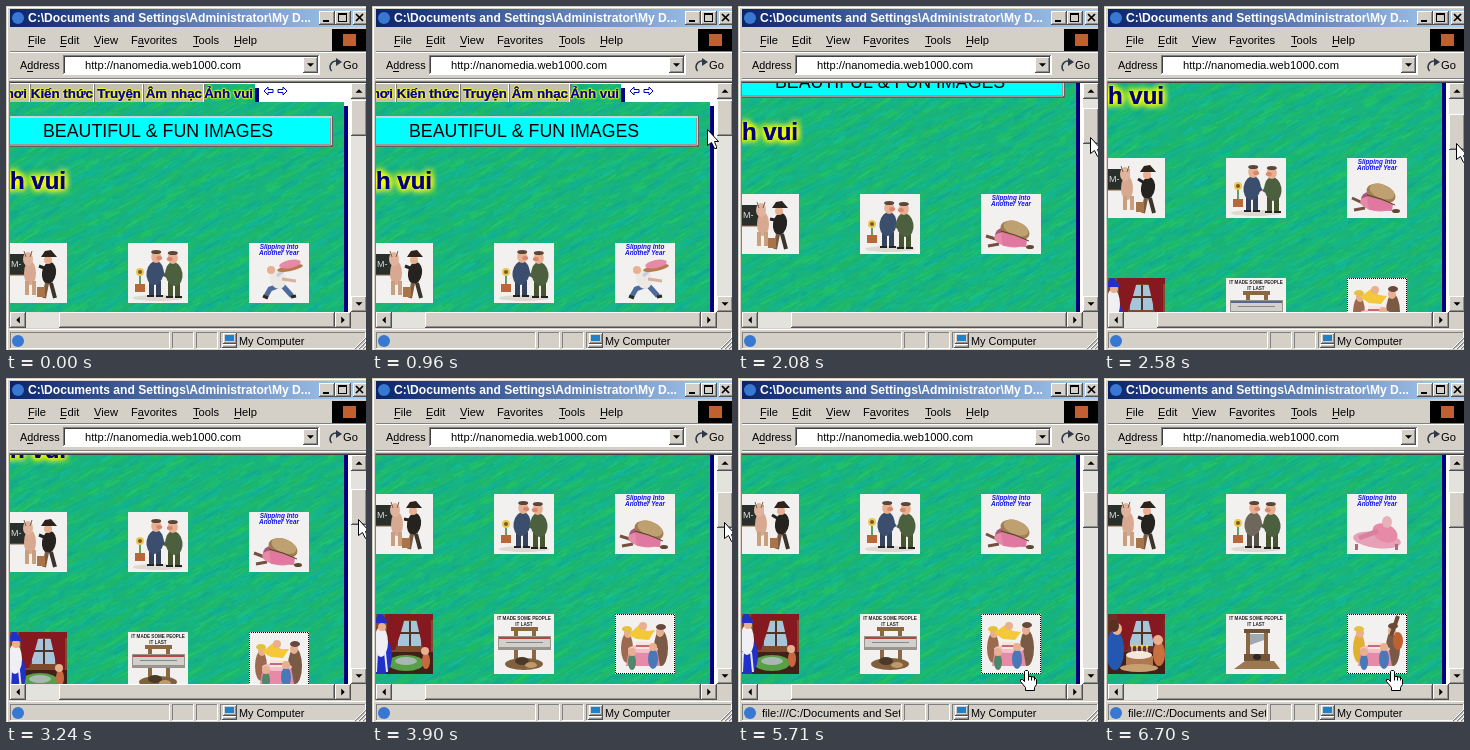
Recreate the animation shown at these times as an HTML page with a canvas. Size 360 by 344 pixels, loop 8 s.

```html
<!DOCTYPE html>
<html lang="en">
<head>
<meta charset="utf-8">
<title>Scrolling a picture page</title>
<style>
html, body { margin: 0; width: 360px; height: 344px; overflow: hidden; }
canvas { display: block; }
</style>
</head>
<body>
<canvas id="stage" width="360" height="344"></canvas>
<script>
const LOOP = 8000, FACE = '#d4d0c8', TRACK = '#e4e2dc';
const SANS = '"Liberation Sans", Arial, sans-serif';
const SKIN = '#e8b090', WOOD = '#8a6844', PINK = '#e68aa8';
const TOP = 77, BOTTOM = 306;
const stage = document.getElementById('stage').getContext('2d');
let c = stage;

// start time, page scroll, pointer x, pointer y
const steps = [
  [0, 0, -50, 0], [480, 0, 72, 127], [640, 0, 168, 127], [800, 0, 270, 127],
  [960, 0, 335, 123], [1120, 0, 347, 123], [1280, 0, 349, 123], [1760, 0, 349, 123],
  [1920, 12, 352, 125], [2080, 49, 352, 131], [2580, 85, 352, 137], [3240, 103, 352, 141],
  [3900, 121, 352, 144], [5060, 121, 349, 179], [5220, 121, 347, 277],
  [5380, 121, 335, 294], [5710, 121, 282, 291], [6700, 121, 282, 291]
];
const FALL = 7, ROW_TWO = 11, HOVER = 16, FINALE = 17;

function box(color, x, y, w, h) { c.fillStyle = color; c.fillRect(x, y, w, h); }
function oval(color, x, y, rx, ry = rx, turn = 0) {
  c.fillStyle = color;
  c.beginPath(); c.ellipse(x, y, rx, ry, turn, 0, 7); c.fill();
}
function line(color, width, ...p) {
  c.strokeStyle = color; c.lineWidth = width;
  c.beginPath();
  for (let i = 0; i < p.length; i += 2) c.lineTo(p[i], p[i + 1]);
  c.stroke();
}
function poly(fill, stroke, ...p) {
  c.beginPath();
  for (let i = 0; i < p.length; i += 2) c.lineTo(p[i], p[i + 1]);
  c.closePath();
  if (fill) { c.fillStyle = fill; c.fill(); }
  if (stroke) { c.strokeStyle = stroke; c.lineWidth = 1; c.stroke(); }
}
function text(s, x, y, size = 11.2, color = '#000', weight = '', align = 'left') {
  c.font = `${weight} ${size}px ${SANS}`;
  c.textAlign = align; c.fillStyle = color;
  c.fillText(s, x, y);
}
function glow(s, x, y, size, color, blur) {
  c.shadowColor = '#ff0'; c.shadowBlur = blur;
  for (let i = 0; i < 5; i++) text(s, x, y, size, color, 'bold', 'right');
  c.shadowBlur = 0;
}
function bevel(x, y, w, h, fill = FACE, sunk = false) {
  const [lit, dim] = sunk ? ['#808080', '#fff'] : ['#fff', '#505050'];
  box(dim, x, y, w, h);
  box(lit, x, y, w - 1, h - 1);
  if (!sunk) box('#909090', x + 1, y + 1, w - 2, h - 2);
  box(fill, x + 1, y + 1, w - (sunk ? 2 : 3), h - (sunk ? 2 : 3));
}
function arrow(x, y, turn, size = 3.5) {
  c.save(); c.translate(x, y); c.rotate(turn);
  poly('#000', null, -size, -size / 2, size, -size / 2, 0, size / 2);
  c.restore();
}

// Brushed green paper with diagonal teal bands
function makePaper() {
  const sheet = document.createElement('canvas');
  sheet.width = 334; sheet.height = 360;
  c = sheet.getContext('2d');
  let seed = 7;
  const rnd = () => (seed = seed * 16807 % 2147483647) / 2147483647;
  box('#18b47c', 0, 0, 334, 360);
  c.globalAlpha = .6;
  for (let i = 0; i < 9000; i++) {
    const x = rnd() * 370 - 20, y = rnd() * 370, len = 4 + rnd() * 11;
    const band = Math.sin((y + x * .55 + 3 * Math.sin(x / 23)) / 20 * 2 * Math.PI);
    const wave = band + (rnd() - .5) * 1.3;
    line(`hsl(${157 - wave * 12} ${74 - wave * 6}% ${39 + wave * 3 + rnd() * 5}%)`, 1 + rnd() * 1.5,
      x, y, x + len, y - len * .55);
  }
  c = stage;
  return sheet;
}
const paper = makePaper();

function man(x, y, coat, legs, lean) {
  const side = Math.sign(lean);
  box(legs, x - 6, y + 27, 5, 15); box(legs, x + 1, y + 27, 5, 15);
  box('#222', x - 8, y + 41, 7, 2); box('#222', x + 1, y + 41, 7, 2);
  oval(coat, x, y + 19, 8.5, 12, lean);
  line(coat, 4, x + 3 * side, y + 12, x + 9 * side, y + 22);
  oval(SKIN, x + lean * 8, y + 3, 5, 6);
  oval('#d88870', x + lean * 8 + 3 * side, y + 4, 3, 2);
  oval('#5a4638', x + lean * 8, y - 2, 5, 2);
}

// Each picture takes the step number, a small wobble and whether it has ended
const pictures = [
  // Classroom
  (n, w, end) => {
    box('#29302c', 0, 11, 24, 21);
    line(WOOD, 1, 0, 32, 24, 32, 24, 11);
    text('M-', 4, 24, 9, '#ddd');
    oval('#d8a890', 23 + w, 30, 6, 12); oval('#e0b49c', 21 + w, 16, 5, 7);
    line('#806050', 1, 17 + w, 8, 19 + w, 14); line('#806050', 1, 25 + w, 8, 23 + w, 14);
    box('#c8a080', 18, 38, 4, 14); box('#c8a080', 25, 38, 4, 14);
    const x = end ? 43 : 42 - w;
    oval('#26221f', x, 30, 7, 11, .15); oval(SKIN, x - 1, 17, 4);
    poly('#2c241c', null, x - 8, 14, x + 8, 14, x + 2, 7, x - 4, 8);
    line('#26221f', 3, x, 27, x - 10, 23 + w * 2);
    line('#7a5a40', 4, x - 2, 40, x - 5, 55); line('#3c342c', 4, x + 2, 40, x + 6, 55);
    box('#a87448', x - 12, 44, 8, 10);
  },
  // Two gentlemen
  (n, w, end) => {
    oval('#ddd8d0', 30, 55, 25, 3);
    box('#b86838', 7, 41, 10, 8);
    line('#388038', 1.5, 12, 41, 12, 30);
    oval('#e8c850', 12, 29 + w, 4); oval('#805828', 12, 29 + w, 2);
    man(27 + w, 11, end ? '#6d675c' : '#3c4e6e', end ? '#575046' : '#34445e', .15);
    man(46 - w, 12, '#4c6040', '#46542f', -.15);
  },
  // The cake carrier
  (n, w, end) => {
    text('Slipping Into', 30, 6, 6.4, '#1010f0', 'bold italic', 'center');
    text('Another Year', 30, 12, 6.4, '#1010f0', 'bold italic', 'center');
    if (end) {
      oval('#e8a0b8', 30, 46, 24, 8, .12); oval(PINK, 38, 39, 13, 9, .4);
      oval('#e8b0b8', 40, 28, 5, 6); line('#d880a0', 5, 31, 37, 12, 44);
      box('#b06878', 8, 50, 3, 6); box('#b06878', 48, 50, 3, 6);
    } else if (n < FALL) {
      c.save(); c.translate(30, 36); c.rotate(n < 5 ? 0 : .15);
      line('#4e6a9c', 5, 2, 6, -9, 10, -13, 17); line('#4e6a9c', 5, 3, 6, 13, 17);
      line('#302820', 3, 12, 18, 17, 17); line('#302820', 3, -16, 17, -11, 19);
      oval('#ece8e4', -1, 0, 8, 10, -.3); oval(SKIN, -8, -9, 4);
      line('#c8ccd8', 3, -2, -3, 8, -11); line('#d8b0a0', 3, 3, 0, 17, 2);
      oval('#b87850', 11, -11, 13, 3, -.2); oval(PINK, 11, -15, 11, 4, -.2);
      c.restore();
    } else {
      line('#735040', 3, 18, 46, 5, 41 + w); line('#735040', 3, 18, 50, 7, 52);
      oval('#a85878', 22, 42, 8, 8); oval(PINK, 28, 46, 15, 7, .2);
      oval('#a07c50', 34, 36 + w / 2, 15, 9, .35);
      oval('#bfa070', 35, 34 + w / 2, 13, 7, .35);
      poly('#e078a0', null, 20, 38, 34, 42, 46, 46, 45, 53, 22, 52);
      line('#58402c', 1, 20, 37, 34, 41, 48, 47);
      oval('#604830', 49, 53, 4, 2);
    }
  },
  // Curtained room
  (n, w, end) => {
    box(end ? '#6c3026' : '#7c4a2c', 0, 0, 60, 60);
    box('#a8c4d8', 25, 7, 23, 25);
    line('#4c3428', 2, 37, 7, 37, 32); line('#4c3428', 2, 25, 19, 48, 19);
    poly('#861820', null, 14, 0, 33, 0, 28, 18, 22, 36, 14, 36);
    poly('#861820', null, 42, 0, 58, 0, 58, 38, 50, 35);
    box('#861820', 12, 0, 48, 6);
    box('#402018', 0, 38, 60, 22);
    if (end) {
      box('#b07850', 21, 42, 27, 9); oval('#f4e8da', 34, 41, 13, 4);
      for (let x = 27; x < 44; x += 5) { line('#fff', 1, x, 39, x, 33); oval('#f8d040', x, 32, 1.5); }
      oval('#c8a070', 34, 54, 19, 4);
      oval('#2458b0', 10, 36, 9, 20); oval(SKIN, 12, 15, 5, 6); oval('#583020', 9, 12, 5, 6);
      oval('#c87040', 54, 40, 6, 12); oval(SKIN, 53, 26, 5);
    } else {
      oval('#58a048', 33, 49, 18, 8); oval('#a8b8b0', 33, 47, 11, 4);
      oval('#2030c8', 7, 42, 12, 20); oval('#f0f0f4', 8, 27 + w, 7, 15);
      oval(SKIN, 9, 12 + w, 4); poly('#2030c8', null, 1, 9, 15, 9, 7, -4);
      line('#e8e8f0', 2, 4, 38, 3, 58); line('#e8e8f0', 2, 12, 38, 14, 58);
      if (n >= ROW_TWO) { oval('#c86840', 53, 46 + w, 4, 8); oval(SKIN, 52, 36 + w, 4); }
    }
  },
  // Wooden frame
  (n, w, end) => {
    text('IT MADE SOME PEOPLE', 30, 6, 4.6, '#222', 'bold', 'center');
    text('IT LAST', 30, 12, 4.6, '#222', 'bold', 'center');
    if (end) {
      line(WOOD, 4, 22, 15, 22, 54); line(WOOD, 4, 40, 15, 40, 54);
      box('#6e5238', 18, 15, 26, 4);
      poly('#a0a8b0', null, 24, 20, 38, 20, 38, 26, 24, 31);
      box('#745438', 18, 40, 26, 7); oval('#302820', 31, 43, 4, 3);
      poly('#9a7850', null, 8, 55, 19, 47, 48, 47, 54, 55);
    } else {
      box(WOOD, 17, 13, 27, 4); box(WOOD, 20, 13, 4, 38); box(WOOD, 38, 13, 4, 38);
      box('#9a958c', 4, 22, 53, 14); box('#d2d0cc', 5, 23, 51, 10);
      box(n >= ROW_TWO ? '#b04840' : '#586888', 5, 23, 51, 2);
      line('#888', 1, 12, 28.5, 49, 28.5);
      if (n >= ROW_TWO) {
        oval('#80603f', 30, 50, 19, 6); oval('#4a3828', 27 + w, 47, 7, 4); oval('#bd9a68', 37, 51, 6, 3);
      }
    }
  },
  // Birthday table
  (n, w, end) => {
    oval('#7a5a44', 46, 34, 7, 18); oval(SKIN, 45, 17 + w, 4, 5);
    oval('#68483c', 46, 12 + w, 5, 3);
    oval(end ? '#e0b030' : '#9d6a50', 12, 34, 6, 15); oval(SKIN, 13, 19, 4, 5);
    oval('#e4c040', 12, 15, 5, 3);
    if (end) {
      line('#6a4a34', 4, 44, 22, 51, 2); oval('#c06030', 51, 27, 5, 9);
    } else {
      poly('#f4c838', null, 13, 20 + w, 24, 11, 32, 17, 40, 17 - w, 34, 26, 22, 25);
      oval(SKIN, 28, 12, 4);
    }
    poly(PINK, null, 14, 35, 42, 35, 45, 52, 11, 52);
    oval('#f2c0cc', 28, 35, 15, 4); box('#f6e6d8', 21, 28, 14, 7); box('#c86878', 21, 31, 14, 2);
    oval('#4878b8', 37 + w, 45, 5, 10); oval(SKIN, 37 + w, 33, 4);
    oval(end ? '#4878b8' : '#50866a', 17, 48, 4, 8); oval(SKIN, 17, 38, 4);
    c.setLineDash([1, 1]); c.lineDashOffset = .5;
    c.strokeStyle = '#000'; c.lineWidth = 1; c.strokeRect(.5, .5, 59, 59);
    c.setLineDash([]);
  }
];

function drawPage(scroll, n) {
  c.save();
  c.beginPath(); c.rect(4, TOP, 341, BOTTOM - TOP); c.clip();
  box('#fff', 4, TOP, 341, BOTTOM - TOP);
  c.translate(0, -scroll);

  // Tabs
  box('#000080', 249, 82, 4, 15);
  box('#c4c0b0', 4, 78, 193, 18);
  c.drawImage(paper, 0, 0, 52, 18, 197, 78, 52, 18);
  for (const x of [23, 87, 136, 197]) { box('#fff', x, 78, 1, 18); box('#777', x + 1, 78, 1, 18); }
  [['nơi', 21], ['Kiến thức', 87], ['Truyện', 135], ['Âm nhạc', 196], ['Ảnh vui', 247]]
    .forEach(([s, x]) => glow(s, x, 92, 13.33, '#0000a0', 2));
  for (const [x, d] of [[258, 1], [281, -1]])
    poly('#fff', '#0000c0', x, 85, x + 4 * d, 81, x + 4 * d, 83.5, x + 9 * d, 83.5,
      x + 9 * d, 86.5, x + 4 * d, 86.5, x + 4 * d, 89);

  // Sheet, banner and heading
  box('#000080', 338, 100, 4, 400);
  c.drawImage(paper, 4, 96);
  box('#606060', 4, 110, 323, 31); box('#c8d8d8', 4, 110, 322, 29);
  box('#a09898', 4, 112, 321, 28); box('#0ff', 4, 112, 320, 26);
  text('BEAUTIFUL & FUN IMAGES', 37, 131, 17.8);
  glow('Ảnh vui', 60, 183, 24, '#000080', 7);

  const wobble = n < 5 ? 0 : [1, -1, 0][n % 3];
  pictures.forEach((draw, i) => {
    c.save();
    c.translate([1, 122, 243][i % 3], i < 3 ? 237 : 357);
    c.beginPath(); c.rect(0, 0, 60, 60); c.clip();
    box('#f2f1ef', 0, 0, 60, 60);
    draw(n, i === 0 && n <= FALL ? 0 : wobble, n === FINALE);
    c.restore();
  });
  c.restore();
}

function drawBars(scroll) {
  box(TRACK, 345, TOP, 15, BOTTOM - TOP);
  bevel(345, TOP, 16, 16); arrow(353, 85, Math.PI);
  bevel(345, BOTTOM - 16, 16, 16); arrow(353, BOTTOM - 8, 0);
  bevel(345, 94 + Math.round(scroll / 6), 16, 36);
  box(FACE, 345, BOTTOM, 15, 16);
  box(TRACK, 4, BOTTOM, 341, 16);
  bevel(4, BOTTOM, 16, 16); arrow(12, BOTTOM + 8, Math.PI / 2);
  bevel(53, BOTTOM, 276, 16);
  bevel(329, BOTTOM, 16, 16); arrow(337, BOTTOM + 8, -Math.PI / 2);
}

function drawWindow(n) {
  box(FACE, 0, 0, 360, 344);
  box('#fff', 1, 1, 359, 1); box('#fff', 1, 1, 1, 343);

  const bar = c.createLinearGradient(4, 0, 350, 0);
  bar.addColorStop(0, '#0a246a'); bar.addColorStop(1, '#a6caf0');
  box(bar, 4, 3, 356, 18);
  oval('#3878d0', 12, 12, 6);
  text('C:\\Documents and Settings\\Administrator\\My D...', 22, 16, 12.1, '#fff', 'bold');
  for (const x of [313, 329, 347]) bevel(x, 5, 16, 14);
  box('#000', 317, 14, 6, 2);
  c.strokeStyle = '#000'; c.lineWidth = 1; c.strokeRect(332.5, 7.5, 8, 8); box('#000', 332, 7, 9, 2);
  line('#000', 1.7, 350, 8, 357, 15); line('#000', 1.7, 357, 8, 350, 15);

  // Menu
  box('#808080', 4, 45, 356, 1); box('#fff', 4, 46, 356, 1);
  [['File', 22], ['Edit', 54], ['View', 88], ['Favorites', 125], ['Tools', 187], ['Help', 228]]
    .forEach(([s, x], i) => {
      text(s, x, 38);
      box('#000', x + (i === 3 ? 7 : 0), 40, 6, 1);
    });
  box('#000', 326, 23, 34, 22);
  box('#c06030', 337, 28, 13, 12);

  // Address
  text('Address', 14, 63, 10.8);
  box('#000', 21, 65, 6, 1);
  bevel(57, 49, 257, 20, '#fff', true);
  box('#404040', 58, 50, 254, 1); box('#404040', 58, 50, 1, 17);
  text('http://nanomedia.web1000.com', 79, 63);
  bevel(297, 51, 15, 16);
  arrow(304.5, 59, 0);
  c.strokeStyle = '#303848'; c.lineWidth = 1.6;
  c.beginPath(); c.arc(330, 61, 6, 2.4, 4.8); c.stroke();
  poly('#303848', null, 330, 52, 336, 56, 330, 60);
  text('Go', 337, 63);
  box('#808080', 4, 72, 356, 1); box('#fff', 4, 73, 356, 1);
  box('#808080', 3, 75, 357, 1); box('#404040', 3, 76, 357, 1);
  box('#808080', 3, 75, 1, 247);

  // Status
  box('#fff', 3, 323, 357, 1);
  for (const [x, w] of [[4, 160], [166, 22], [190, 22], [214, 146]]) bevel(x, 326, w, 17, FACE, true);
  oval('#3878d0', 12, 335, 6);
  if (n >= HOVER) {
    c.save();
    c.beginPath(); c.rect(22, 326, 140, 16); c.clip();
    text('file:///C:/Documents and Settings', 24, 339);
    c.restore();
  }
  bevel(217, 327, 14, 11); box('#2080c8', 219, 329, 9, 6);
  bevel(216, 338, 15, 4);
  text('My Computer', 233, 339, 10.9);
  for (let d = 3; d < 12; d += 4) {
    line('#808080', 1.5, 360 - d, 343, 360, 343 - d);
    line('#fff', 1, 359 - d, 343, 360, 342 - d);
  }
}

function drawPointer(x, y, hand) {
  c.save(); c.translate(x + .5, y + .5);
  if (hand) {
    poly('#fff', '#000', 5, 1, 7, 1, 8, 2, 8, 7, 11, 7, 14, 8, 16, 10, 16, 15, 14, 18, 14, 21,
      5, 21, 5, 18, 0, 12, 0, 10, 2, 10, 4, 12, 4, 2);
    for (const k of [8, 11, 14]) line('#000', 1, k, 7, k, 11);
  } else {
    poly('#fff', '#000', 0, 0, 0, 16, 4, 13, 7, 19, 9, 19, 9, 17, 7, 12, 11, 12);
  }
  c.restore();
}

const start = performance.now();
function frame() {
  const t = (performance.now() - start) % LOOP;
  const n = steps.findLastIndex(s => s[0] <= t);
  const [, scroll, x, y] = steps[n];
  drawWindow(n);
  drawBars(scroll);
  drawPage(scroll, n);
  drawPointer(x, y, n >= HOVER);
  requestAnimationFrame(frame);
}
frame();
</script>
</body>
</html>
```
